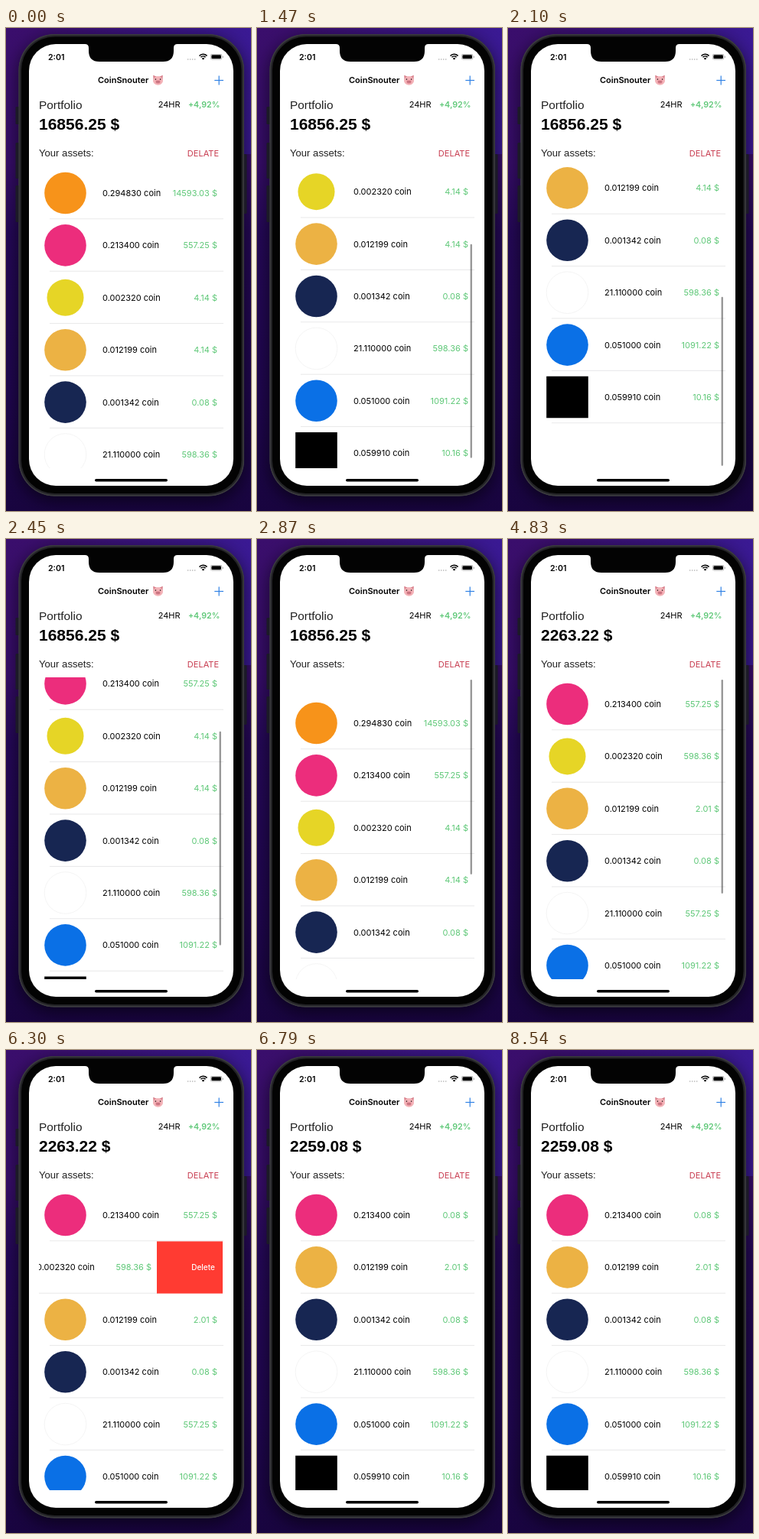
Write an HTML page with a canvas that moves like this. It is 320 px wide and 632 px high and loops after 8.61 s.

```html
<!DOCTYPE html>
<html lang="en">
<head>
<meta charset="utf-8">
<title>Portfolio</title>
<style>
html, body { margin: 0; width: 100%; height: 100%; overflow: hidden; background: #1a0642; }
canvas { display: block; width: 320px; height: 632px; }
</style>
</head>
<body>
<canvas id="stage"></canvas>
<script>
const W = 320, H = 632, LOOP = 8610, STEP = 70;
const LIST = { left: 43, right: 283, top: 181.8, bottom: 576, row: 68.4 };
const BAR = { top: 184, bottom: 573, length: 280 };
const SANS = 'Inter, "Open Sans", sans-serif';
const GROTESK = '"Liberation Sans", Arial, sans-serif';
const GREEN = '#5fc878';

// values: price before, between and after the two deletions
const coins = [
  { color: '#f7931a', amount: '0.294830', values: ['14593.03'] },
  { color: '#ec2d7c', amount: '0.213400', values: ['557.25', '557.25', '0.08'] },
  { color: '#e6d526', amount: '0.002320', values: ['4.14', '598.36'], r: 24 },
  { color: '#ecb244', amount: '0.012199', values: ['4.14', '2.01', '2.01'] },
  { color: '#172652', amount: '0.001342', values: ['0.08', '0.08', '0.08'] },
  { color: '#ffffff', amount: '21.110000', values: ['598.36', '557.25', '598.36'], rim: '#f2f2f2' },
  { color: '#0a70e6', amount: '0.051000', values: ['1091.22', '1091.22', '1091.22'] },
  { color: '#000000', amount: '0.059910', values: ['10.16', '10.16', '10.16'], square: true }
];
const totals = ['16856.25 $', '2263.22 $', '2259.08 $'];
const updates = [4830, 6720];
const deletions = [
  { coin: 0, start: 4130, highlight: true },
  { coin: 2, start: 6020 }
];

const scrollKeys = [
  [1050, 0], [1120, 10], [1260, 56], [1470, 138.6], [1610, 172], [1750, 194], [1960, 211.8],
  [2100, 211.8], [2240, 180], [2450, 95], [2660, 20], [2800, -14], [2870, -25], [2940, -28],
  [3010, -23], [3150, -11], [3290, -5], [3430, -1.5], [3570, 0]
];
const swipeKeys = [[-70, 0], [0, 22.5], [140, 60], [280, 86], [350, 170], [420, 240]];
const foldKeys = [[280, 0], [350, 0.1], [420, 0.45], [490, 0.8], [560, 1]];
const barKeys = [[1050, 0], [1120, 1], [5670, 1], [5880, 0]];

const canvas = document.getElementById('stage');
const ctx = canvas.getContext('2d');
const dpr = window.devicePixelRatio || 1;
canvas.width = W * dpr;
canvas.height = H * dpr;

function track(keys, t) {
  if (t <= keys[0][0]) return keys[0][1];
  for (let i = 1; i < keys.length; i++) {
    const [t0, a] = keys[i - 1], [t1, b] = keys[i];
    if (t <= t1) return a + (b - a) * (t - t0) / (t1 - t0);
  }
  return keys[keys.length - 1][1];
}

function text(str, x, y, size, color = '#000', weight = 400, align = 'left', family = SANS) {
  ctx.font = `${weight} ${size}px ${family}`;
  ctx.textAlign = align;
  ctx.fillStyle = color;
  ctx.fillText(str, x, y);
}

function box(x, y, w, h, r, color) {
  ctx.beginPath();
  ctx.roundRect(x, y, w, h, r);
  ctx.fillStyle = color;
  ctx.fill();
}

function oval(x, y, rx, ry, color) {
  ctx.beginPath();
  ctx.ellipse(x, y, rx, ry, 0, 0, Math.PI * 2);
  ctx.fillStyle = color;
  ctx.fill();
}

function line(x1, y1, x2, y2, color, width) {
  ctx.beginPath();
  ctx.moveTo(x1, y1);
  ctx.lineTo(x2, y2);
  ctx.strokeStyle = color;
  ctx.lineWidth = width;
  ctx.stroke();
}

function gradient(x1, y1, x2, y2, colors) {
  const g = ctx.createLinearGradient(x1, y1, x2, y2);
  colors.forEach(([at, c]) => g.addColorStop(at, c));
  return g;
}

function drawBackdrop() {
  ctx.fillStyle = gradient(0, 0, 0, H, [
    [0, '#3a0e6c'], [0.28, '#350c66'], [0.42, '#240856'], [0.75, '#1f064e'], [1, '#18043f']
  ]);
  ctx.fillRect(0, 0, W, H);
  ctx.fillStyle = gradient(60, 0, W, 0, [[0, 'rgba(58,30,165,0)'], [1, 'rgba(58,30,165,.7)']]);
  ctx.fillRect(0, 0, W, 165);
}

function drawPhone() {
  ctx.save();
  ctx.shadowColor = 'rgba(0,0,0,.6)';
  ctx.shadowBlur = 22 * dpr;
  ctx.shadowOffsetY = 6 * dpr;
  box(16.5, 8, 294.5, 604.5, 47, '#3a3a3e');
  ctx.restore();

  [[12.5, 103, 23], [12.5, 150, 47], [12.5, 206, 48], [309, 165, 78]].forEach(
    ([x, y, h]) => box(x, y, 5.5, h, 1.5, '#1c1a27'));
  box(16.5, 8, 294.5, 604.5, 47, '#3a3a3e');
  box(18, 9.5, 291.5, 601.5, 45.5, '#232326');
  box(20, 11.5, 287.5, 597.5, 43.5, '#030303');
  box(30, 21, 267, 578, 35, '#fff');

  ctx.beginPath();
  ctx.moveTo(103, 20);
  ctx.lineTo(103, 21);
  ctx.quadraticCurveTo(108, 21, 108, 26);
  ctx.lineTo(108, 30);
  ctx.quadraticCurveTo(108, 44, 122, 44);
  ctx.lineTo(205, 44);
  ctx.quadraticCurveTo(219, 44, 219, 30);
  ctx.lineTo(219, 26);
  ctx.quadraticCurveTo(219, 21, 224, 21);
  ctx.lineTo(224, 20);
  ctx.fillStyle = '#030303';
  ctx.fill();
  box(116, 590, 95, 3.5, 1.75, '#000');
}

function drawStatus() {
  text('2:01', 55, 41.8, 10.6, '#000', 600);
  for (let i = 0; i < 4; i++) oval(237.7 + i * 3, 41, 0.8, 0.8, '#aaa');
  ctx.strokeStyle = '#000';
  ctx.lineWidth = 1.6;
  [6.9, 4.2].forEach(r => {
    ctx.beginPath();
    ctx.arc(257.5, 41.2, r, -Math.PI * 0.76, -Math.PI * 0.24);
    ctx.stroke();
  });
  ctx.beginPath();
  ctx.moveTo(257.5, 41.6);
  ctx.arc(257.5, 41.6, 2.5, -Math.PI * 0.76, -Math.PI * 0.24);
  ctx.fillStyle = '#000';
  ctx.fill();
  box(267, 34, 15.3, 7.6, 2.3, '#aaa');
  box(267.7, 34.7, 13.9, 6.2, 1.7, '#fff');
  box(268.4, 35.3, 12.5, 5, 1.2, '#000');
  box(282.8, 36.5, 1, 2.6, 0.5, '#aaa');
}

function drawPig(x, y) {
  [-1, 1].forEach(s => {
    ctx.beginPath();
    ctx.moveTo(x + s * 1.5, y - 4.5);
    ctx.lineTo(x + s * 6.3, y - 6.6);
    ctx.lineTo(x + s * 6, y - 0.5);
    ctx.fillStyle = '#d9828d';
    ctx.fill();
  });
  oval(x, y + 0.6, 6.5, 5.9, '#f3b3b8');
  oval(x, y + 2.2, 3.3, 2.4, '#e58f9a');
  [-1, 1].forEach(s => {
    oval(x + s * 3.1, y - 1.2, 0.8, 0.9, '#3b2226');
    oval(x + s * 1.2, y + 2.2, 0.6, 1, '#8c3d4c');
  });
}

function drawHeader(phase) {
  text('CoinSnouter', 120, 72.4, 11, '#000', 600);
  drawPig(198.5, 68.3);
  line(272.3, 68.5, 284, 68.5, '#2f80e4', 1.2);
  line(278.2, 62.6, 278.2, 74.4, '#2f80e4', 1.2);
  text('Portfolio', 43, 105.6, 15.4, '#222', 400, 'left', GROTESK);
  text('24HR', 198.7, 104, 11);
  text('+4,92%', 279.4, 104, 10.7, GREEN, 600, 'right');
  text(totals[phase], 43, 133.2, 21, '#000', 700, 'left', GROTESK);
  text('Your assets:', 43, 167.8, 13.1, '#222', 400, 'left', GROTESK);
  text('DELATE', 278, 168.2, 11, '#c73a4e', 400, 'right');
}

function drawCoin(coin, x, y) {
  if (coin.square) return box(x - 27.3, y - 27.3, 54.6, 54.6, 0, coin.color);
  const r = coin.r || 27.3;
  oval(x, y, r, r, coin.color);
  if (coin.rim) {
    ctx.strokeStyle = coin.rim;
    ctx.lineWidth = 0.8;
    ctx.stroke();
  }
}

function drawRow(coin, y, height, phase, swipe, shade) {
  const { left, right, row } = LIST;
  const mid = y + row / 2;
  ctx.save();
  ctx.beginPath();
  ctx.rect(left, y, right - left + 1, height + 0.5);
  ctx.clip();
  if (shade > 0) {
    ctx.fillStyle = `rgba(209,209,212,${shade})`;
    ctx.fillRect(left, y, right - left - swipe, height);
  }
  drawCoin(coin, 77.5 - swipe, mid);
  text(coin.amount + ' coin', 126 - swipe, mid + 4, 11);
  const price = coin.values[Math.min(phase, coin.values.length - 1)];
  text(price + ' $', 276 - swipe, mid + 4, 11, GREEN, 400, 'right');
  line(57 - swipe, y + row - 0.4, 284 - swipe, y + row - 0.4, '#dedee0', 0.7);
  if (swipe > 0) {
    const edge = right - swipe;
    ctx.fillStyle = '#ff3b32';
    ctx.fillRect(edge, y, swipe, height);
    const x = swipe > 120 ? edge + 25.5 : Math.max(edge + 25.5, 257.5);
    text('Delete', x, mid + 3.6, 10, '#fff', 500, 'center');
  }
  ctx.restore();
}

function drawList(t, phase, scroll) {
  ctx.save();
  ctx.beginPath();
  ctx.rect(LIST.left, 181, 241, LIST.bottom - 181);
  ctx.clip();
  let y = LIST.top - scroll;
  coins.forEach((coin, i) => {
    const cut = deletions.find(d => d.coin === i);
    const age = cut ? t - cut.start : -1000;
    const height = LIST.row * (1 - track(foldKeys, age));
    if (height > 0.1) {
      const shade = cut && cut.highlight && age >= 0 ? Math.max(0, 1 - age / 240) : 0;
      drawRow(coin, y, height, phase, track(swipeKeys, age), shade);
    }
    y += height;
  });
  ctx.restore();
}

// the bar slides with the list and shortens against either end
function drawScrollbar(t, scroll) {
  const alpha = track(barKeys, t);
  if (!alpha) return;
  const limit = coins.length * LIST.row - (LIST.bottom - LIST.top);
  const over = Math.max(0, -scroll, scroll - limit);
  const length = BAR.length - over;
  const part = Math.min(1, Math.max(0, scroll / limit));
  const top = BAR.top + part * (BAR.bottom - BAR.top - length);
  box(278.6, top, 2.3, length, 1.15, `rgba(0,0,0,${0.42 * alpha})`);
}

function render(now) {
  const t = Math.floor(now % LOOP / STEP) * STEP;
  const phase = updates.filter(u => t >= u).length;
  const scroll = track(scrollKeys, t);
  ctx.setTransform(dpr, 0, 0, dpr, 0, 0);
  drawBackdrop();
  drawPhone();
  drawStatus();
  drawHeader(phase);
  drawList(t, phase, scroll);
  drawScrollbar(t, scroll);
}

const begin = performance.now();
function loop() {
  render(performance.now() - begin);
  requestAnimationFrame(loop);
}
loop();
</script>
</body>
</html>
```
